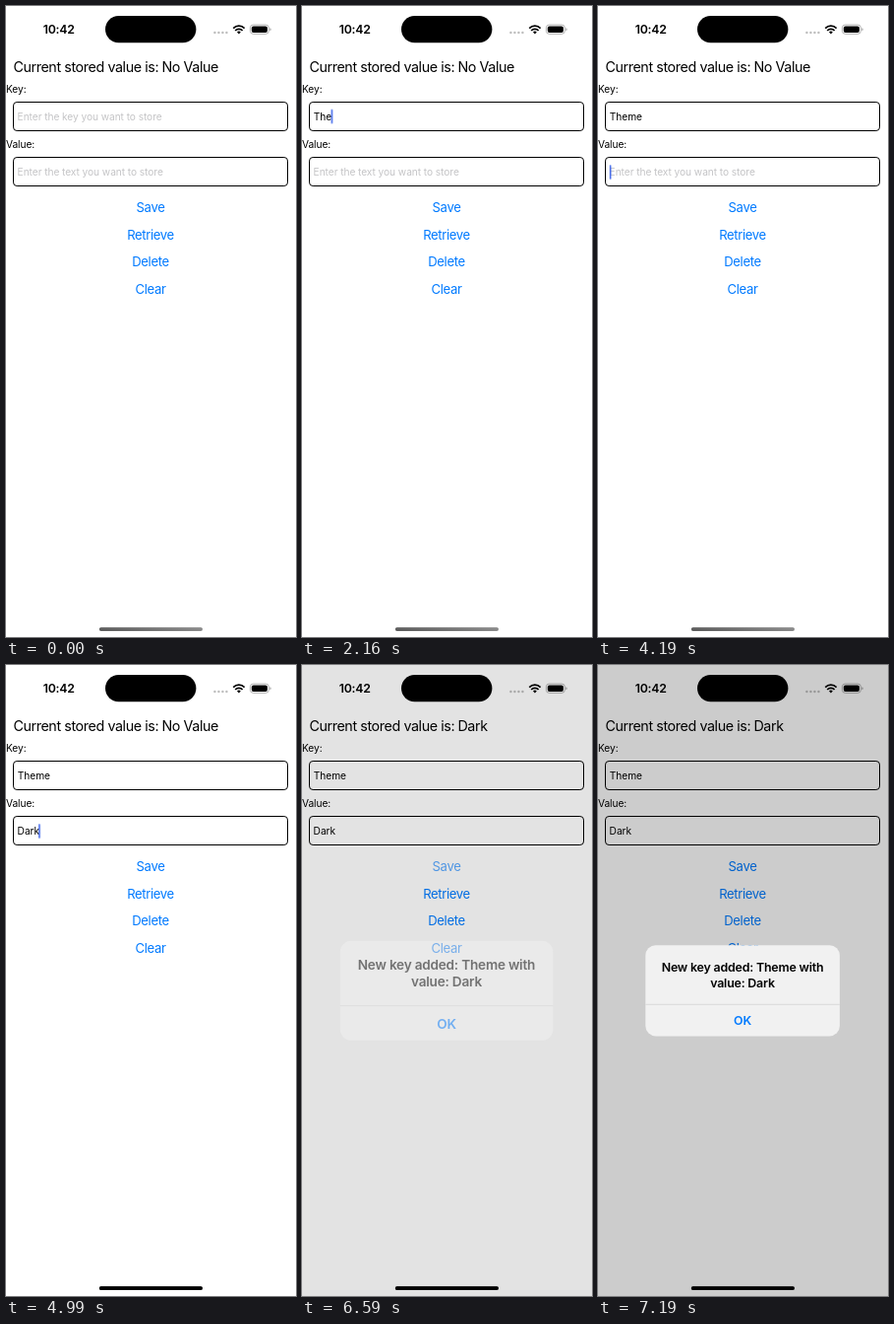
An HTML page that plays this animation: 295x640 px, repeating every 8000 ms.

```html
<!DOCTYPE html>
<html lang="en">
<head>
<meta charset="utf-8">
<title>Key value store</title>
<style>
  html, body { margin: 0; width: 100%; height: 100%; overflow: hidden; background: #fff; }
  svg { display: block; width: 295px; height: 640px; font-family: Inter, "Liberation Sans", sans-serif; }
  .title { font-size: 14.3px; letter-spacing: -.4px; }
  .small { font-size: 10.2px; letter-spacing: -.07px; }
  .hint { fill: #c4c4c6; }
  .field { fill: none; stroke: #000; }
  .buttons { font-size: 13.1px; letter-spacing: -.36px; fill: #007aff; text-anchor: middle; }
  .clock { font-size: 12.3px; font-weight: 600; letter-spacing: -.27px; }
  .alert { font-size: 12.4px; font-weight: 600; letter-spacing: -.19px; text-anchor: middle;
           transform-origin: 147.2px 330.3px; }

  /* Every part runs on one 8 s clock with hard steps. */
  .a { animation: 8s step-end infinite; }

  .key-hint { animation-name: keyHint; }
  @keyframes keyHint { 0% { opacity: 1 } 23%, 100% { opacity: 0 } }
  .val-hint { animation-name: valHint; }
  @keyframes valHint { 0% { opacity: 1 } 53.625%, 100% { opacity: 0 } }

  .k1 { animation-name: k1 } @keyframes k1 { 0% { fill-opacity: 0 } 23%, 100% { fill-opacity: 1 } }
  .k2 { animation-name: k2 } @keyframes k2 { 0% { fill-opacity: 0 } 24.625%, 100% { fill-opacity: 1 } }
  .k3 { animation-name: k3 } @keyframes k3 { 0% { fill-opacity: 0 } 27%, 100% { fill-opacity: 1 } }
  .k4 { animation-name: k4 } @keyframes k4 { 0% { fill-opacity: 0 } 28.875%, 100% { fill-opacity: 1 } }
  .k5 { animation-name: k5 } @keyframes k5 { 0% { fill-opacity: 0 } 31.875%, 100% { fill-opacity: 1 } }
  .v1 { animation-name: v1 } @keyframes v1 { 0% { fill-opacity: 0 } 53.625%, 100% { fill-opacity: 1 } }
  .v2 { animation-name: v2 } @keyframes v2 { 0% { fill-opacity: 0 } 55%, 100% { fill-opacity: 1 } }
  .v3 { animation-name: v3 } @keyframes v3 { 0% { fill-opacity: 0 } 57.375%, 100% { fill-opacity: 1 } }
  .v4 { animation-name: v4 } @keyframes v4 { 0% { fill-opacity: 0 } 61.125%, 100% { fill-opacity: 1 } }

  .caret { fill: #3b63ea; animation-name: caretMove, caretBlink; }
  @keyframes caretMove {
    0% { transform: translate(11.8px, 104.7px) }
    23% { transform: translate(18px, 104.7px) }
    24.625% { transform: translate(23.8px, 104.7px) }
    27% { transform: translate(29.6px, 104.7px) }
    28.875% { transform: translate(38.2px, 104.7px) }
    31.875% { transform: translate(43.7px, 104.7px) }
    50.875% { transform: translate(11.8px, 161.2px) }
    53.625% { transform: translate(19px, 161.2px) }
    55%, 100% { transform: translate(33.2px, 161.2px) }
  }
  @keyframes caretBlink {
    0% { opacity: 0 }
    10.75% { opacity: .5 }
    12% { opacity: 1 }
    19.25% { opacity: .9 }
    20.75% { opacity: 0 }
    23% { opacity: 1 }
    38.25% { opacity: .9 }
    39.625% { opacity: 0 }
    42.75% { opacity: .5 }
    44.125% { opacity: 1 }
    55% { opacity: 0 }
    61.125% { opacity: 1 }
    70% { opacity: 0 }
    73.125% { opacity: .5 }
    74.5% { opacity: 1 }
    82.375%, 100% { opacity: 0 }
  }

  .bar { animation-name: bar; }
  @keyframes bar { 0% { opacity: 0 } 61.125% { opacity: .6 } 62.375%, 100% { opacity: 1 } }

  .before { animation-name: before; }
  @keyframes before { 0% { opacity: 1 } 81.125%, 100% { opacity: 0 } }
  .after { animation-name: after; }
  @keyframes after { 0% { opacity: 0 } 81.125%, 100% { opacity: 1 } }

  .save { animation-name: save; }
  @keyframes save {
    0% { opacity: 1 }
    79.75% { opacity: .2 }
    82.375% { opacity: .65 }
    83.625% { opacity: .95 }
    85%, 100% { opacity: 1 }
  }
  .dim { animation-name: dim; }
  @keyframes dim {
    0% { opacity: 0 }
    82.375% { opacity: .11 }
    83.625% { opacity: .175 }
    85% { opacity: .195 }
    86.25%, 100% { opacity: .2 }
  }
  .alert { animation-name: alert; }
  @keyframes alert {
    0% { opacity: 0; transform: scale(1.2) }
    82.375% { opacity: .5; transform: scale(1.096) }
    83.625% { opacity: .85; transform: scale(1.03) }
    85% { opacity: .97; transform: scale(1.008) }
    86.25%, 100% { opacity: 1; transform: scale(1) }
  }
</style>
</head>
<body>
<svg viewBox="0 0 295 640">
  <defs>
    <linearGradient id="fade">
      <stop offset="0" stop-color="#5c5c5c"/>
      <stop offset="1" stop-color="#8a8a8a"/>
    </linearGradient>
  </defs>
  <rect width="295" height="640" fill="#fff"/>

  <!-- status bar -->
  <text class="clock" x="37.8" y="28.4">10:42</text>
  <rect x="101" y="10" width="92.4" height="27.2" rx="13.6"/>
  <g fill="#bdbdbd">
    <circle cx="212.4" cy="27" r="1.2"/>
    <circle cx="216.4" cy="27" r="1.2"/>
    <circle cx="220.4" cy="27" r="1.2"/>
    <circle cx="224.4" cy="27" r="1.2"/>
  </g>
  <g fill="none" stroke="#000" stroke-width="1.7">
    <path d="M231.2 22.6a8 8 0 0 1 11.4 0"/>
    <path d="M233.2 25a5 5 0 0 1 7.4 0"/>
  </g>
  <path d="M236.9 28.4l-1.9-2a2.8 2.8 0 0 1 3.8 0z"/>
  <rect x="248.4" y="19.1" width="18.9" height="9.2" rx="3" fill="none" stroke="#a8a8a8" stroke-width=".9"/>
  <rect x="249.8" y="20.5" width="16.1" height="6.4" rx="1.9"/>
  <path d="M268.4 22.2q1.3 .4 1.3 1.5t-1.3 1.5z" fill="#a8a8a8"/>

  <!-- form -->
  <g class="title">
    <text x="7.4" y="67">Current stored value is:</text>
    <text class="a before" x="158.4" y="67">No Value</text>
    <text class="a after" x="158.4" y="67">Dark</text>
  </g>
  <rect class="field" x="7.5" y="97.5" width="279" height="29" rx="3.6"/>
  <rect class="field" x="7.5" y="153.5" width="279" height="29" rx="3.6"/>
  <g class="small">
    <text x="0" y="87.5">Key:</text>
    <text x="0" y="143.8">Value:</text>
    <text class="hint a key-hint" x="11.6" y="115.8">Enter the key you want to store</text>
    <text class="hint a val-hint" x="11.6" y="172.3">Enter the text you want to store</text>
    <text x="11.8" y="115.8"><tspan class="a k1">T</tspan><tspan class="a k2">h</tspan><tspan class="a k3">e</tspan><tspan class="a k4">m</tspan><tspan class="a k5">e</tspan></text>
    <text x="11.6" y="172.3"><tspan class="a v1">D</tspan><tspan class="a v2">a</tspan><tspan class="a v3">r</tspan><tspan class="a v4">k</tspan></text>
  </g>
  <rect class="a caret" width="1.5" height="14.6" rx=".7"/>
  <g class="buttons">
    <text class="a save" x="147" y="209">Save</text>
    <text x="147" y="236.6">Retrieve</text>
    <text x="147" y="264.1">Delete</text>
    <text x="147" y="291.6">Clear</text>
  </g>

  <rect class="a dim" width="295" height="640"/>

  <!-- alert -->
  <g class="a alert">
    <rect x="48.3" y="284.2" width="197.6" height="92.2" rx="10.4" fill="#f1f1f1"/>
    <text x="147" y="310.7">New key added: Theme with</text>
    <text x="147" y="326.7">value: Dark</text>
    <path d="M48.3 344.3h197.6" stroke="#d3d3d4" stroke-width=".8"/>
    <text x="147" y="365.2" fill="#007aff">OK</text>
  </g>

  <!-- home indicator -->
  <rect x="94.8" y="630.2" width="105.2" height="3.8" rx="1.9" fill="url(#fade)"/>
  <rect class="a bar" x="94.8" y="630.2" width="105.2" height="3.8" rx="1.9"/>
</svg>
</body>
</html>
```
